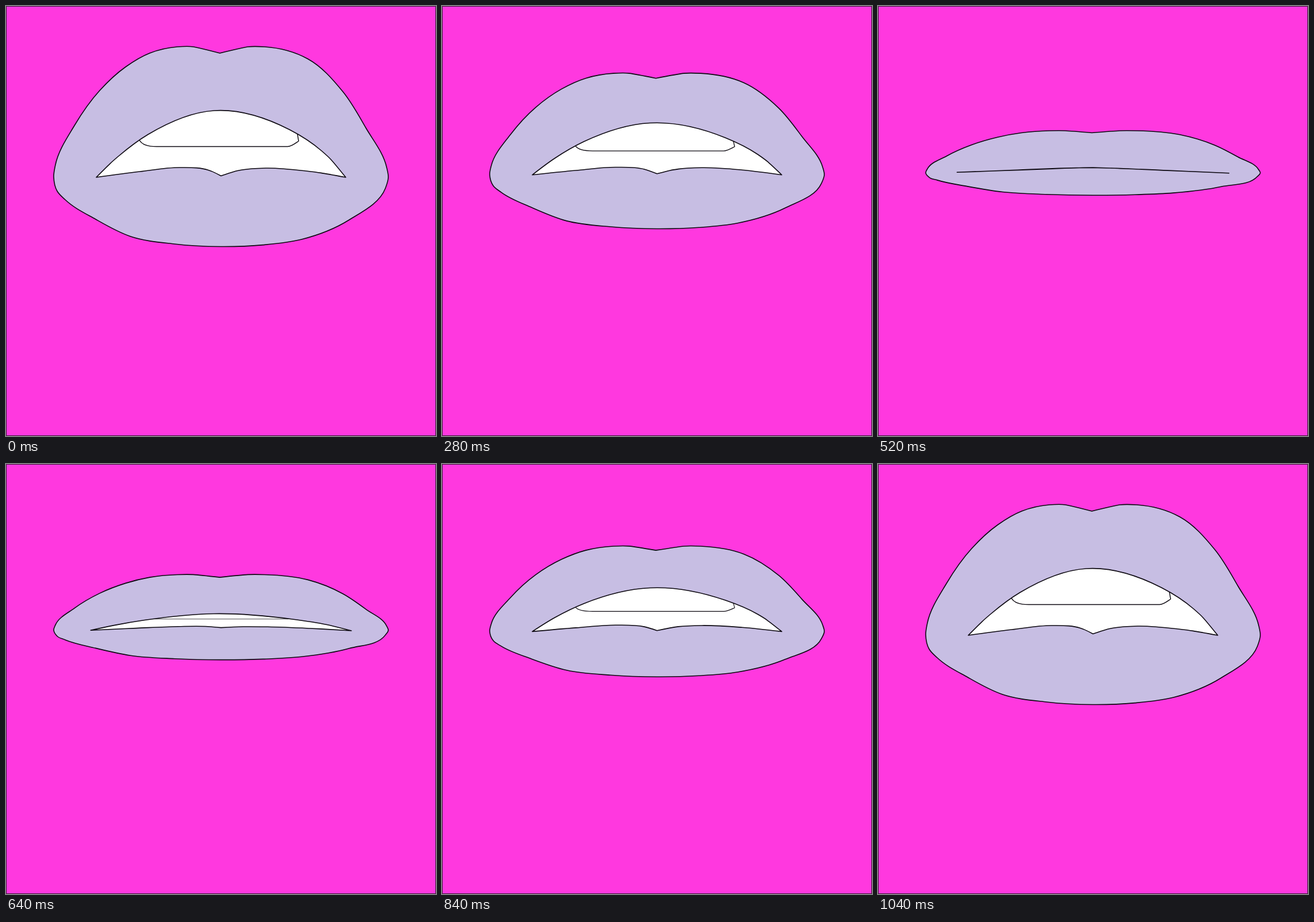
These frames come from a looping animation (748x748 px, 1.16 s). An HTML page with a canvas:

```html
<!DOCTYPE html>
<html lang="en">
<head>
<meta charset="utf-8">
<title>Lips</title>
<style>
  html, body { margin: 0; width: 100%; height: 100%; overflow: hidden; background: #ff38df; }
  canvas { display: block; }
</style>
</head>
<body>
<canvas id="stage" width="748" height="748"></canvas>
<script>
const ctx = document.getElementById('stage').getContext('2d');
const LOOP = 1160, STEP = 40;
const MID_X = 374, PARTED = .53, CLOSED = .323;

// Key points of the wide open pose; every arc runs from corner to corner.
const points = text => text.split(' ').map(pair => pair.split(',').map(Number));
const LIPS = [points(
  '372,82 298,71 250,82 208,106 163,147 119,208 86,276 83,297 89,322 103,337 156,371 ' +
  '217,401 293,414 374,418.5 447,415.6 514,406 597,372 660,317 665,298 662,280 626,212 ' +
  '586,149 525,92 450,71 372,82')];
const MOUTH = [
  points('157,298 196,261 247,223.5 362,182 493,215 549,252 591,298'),
  points('591,298 522,287 452,282 411,285 374,295.5'),
  points('374,295.5 352,285.4 303,281 233,288 157,298')
];
const TEETH = new Path2D(
  'M232 233C236 241 246 244.5 262 244.5H490C496 244.5 503 239 509 235L507 223 495 150H300L246 221Z');

// time, height of the lips, offset of the teeth
const KEYS = [
  [0, 1, 0], [120, 1, 0], [280, .778, 0], [360, PARTED, 3], [520, CLOSED, 3],
  [760, PARTED, 3.5], [920, .778, -3.5], [1040, 1, 0], [LOOP, 1, 0]
];

const mix = (a, b, k) => a + (b - a) * k;

function poseAt(t) {
  const i = KEYS.findIndex(key => key[0] > t);
  const a = KEYS[i - 1], b = KEYS[i];
  const k = (t - a[0]) / (b[0] - a[0]);
  return [mix(a[1], b[1], k), mix(a[2], b[2], k)];
}

// Smooth arc whose tangents follow the circle through neighbouring points.
function arc(pts) {
  const last = pts.length - 1;
  const handles = pts.map(([x, y], i) => {
    if (i === 0 || i === last) return null;
    const ax = x - pts[i - 1][0], ay = y - pts[i - 1][1];
    const bx = pts[i + 1][0] - x, by = pts[i + 1][1] - y;
    const la = Math.hypot(ax, ay), lb = Math.hypot(bx, by);
    const angle = Math.atan2(ay / la ** 2 + by / lb ** 2, ax / la ** 2 + bx / lb ** 2);
    const along = d => [x + Math.cos(angle) * d, y + Math.sin(angle) * d];
    return { before: along(-la / 3), after: along(lb / 3) };
  });
  ctx.lineTo(...pts[0]);
  for (let i = 0; i < last; i++) {
    const from = handles[i], to = handles[i + 1];
    const c1 = from ? from.after : to.before;
    const c2 = to ? to.before : from.after;
    ctx.bezierCurveTo(...c1, ...c2, ...pts[i + 1]);
  }
}

function trace(arcs, place) {
  ctx.beginPath();
  arcs.forEach(pts => arc(pts.map(place)));
  ctx.closePath();
}

function draw(t) {
  const [scale, shift] = poseAt(t);
  const closure = Math.max(0, (PARTED - scale) / (PARTED - CLOSED));
  const centre = 278.9 + 7.7 * closure;
  const squash = ([x, y]) => [x, mix(centre, y, scale)];
  // The closing mouth flattens into a long, slightly bent line.
  const flatten = ([x, y]) => {
    const dx = (x - MID_X) * 1.09;
    const lineY = 281 + .04 * (Math.hypot(dx, 12) - 12) + .003 * dx;
    return [mix(x, MID_X + dx, closure), mix(squash([x, y])[1], lineY, closure)];
  };

  ctx.fillStyle = '#ff38df';
  ctx.fillRect(0, 0, 748, 748);
  ctx.strokeStyle = '#2a1a28';
  ctx.lineWidth = 1;
  ctx.strokeRect(.5, .5, 747, 747);

  ctx.lineJoin = 'round';
  ctx.strokeStyle = '#0c0810';
  ctx.lineWidth = 1.6;
  trace(LIPS, squash);
  ctx.fillStyle = '#c7bee3';
  ctx.fill();
  ctx.stroke();

  trace(MOUTH, flatten);
  ctx.fillStyle = '#fff';
  ctx.fill();
  ctx.save();
  ctx.clip();
  const teeth = new Path2D();
  teeth.addPath(TEETH, new DOMMatrix([1, 0, 0, scale, 0, centre * (1 - scale) + shift]));
  ctx.lineWidth = Math.min(1.5, 1.7 * scale);
  ctx.stroke(teeth);
  ctx.restore();
  ctx.stroke();
}

function tick() {
  const t = performance.now() % LOOP;
  draw(Math.floor(t / STEP) * STEP);
  requestAnimationFrame(tick);
}
tick();
</script>
</body>
</html>
```
